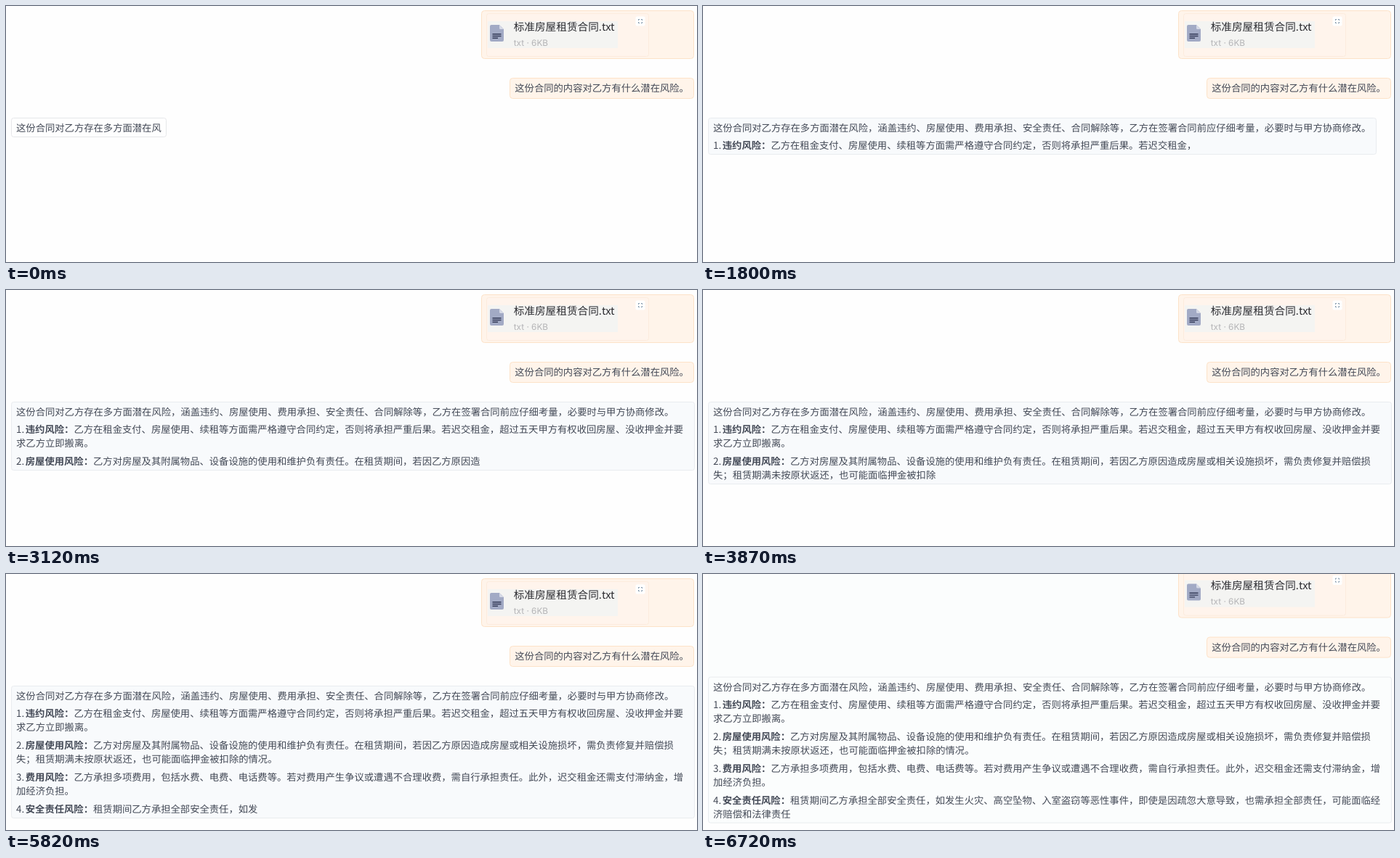
An HTML page for the animation above (8.36 s loop, 951 by 353 pixels).

```html
<!DOCTYPE html>
<html lang="zh-CN">
<head>
<meta charset="utf-8">
<style>
  html, body { margin: 0; width: 100%; height: 100%; overflow: hidden; background: #fefefe; }
  svg { display: block; width: 951px; height: 353px; }
  text { font: 13.32px "Noto Sans CJK SC", sans-serif; fill: #434956; text-rendering: geometricPrecision; }
  .title { font-weight: 700; }
  .name { font-size: 14.65px; fill: #2c2c31; }
  .meta { font: 11.8px Inter, sans-serif; fill: #b4b4b6; }
  .bubble { fill: #fff4ea; stroke: #fde2c8; }
</style>
</head>
<body>
<svg viewBox="0 0 951 353">
  <rect id="tint" x="7" width="940" height="343" fill="#fbfdfd"/>
  <g id="chat">
    <rect class="bubble" x="654.5" y="6.5" width="292" height="66" rx="4"/>
    <rect x="661.5" y="10.5" width="223" height="59" rx="3" fill="#fff4ec" stroke="#fcebdd"/>
    <rect x="663" y="21" width="179" height="37" fill="#f4f4f2"/>
    <path d="M668 26h11l6 6v15q0 2-2 2h-15q-2 0-2-2v-19q0-2 2-2z" fill="#a2aac5"/>
    <path d="M679 26l6 6h-4.5q-1.5 0-1.5-1.5z" fill="#d5d9e6"/>
    <path d="M669.5 38.7h12M669.5 41.5h12M669.5 44.3h7.5" stroke="#343b58" stroke-width="1.4"/>
    <text class="name" x="698.7" y="33.8">标准房屋租赁合同.txt</text>
    <text class="meta" x="698.7" y="54.5">txt · 6KB</text>
    <rect x="866.5" y="14.5" width="13" height="13" rx="2" fill="#fff"/>
    <path d="M870.5 20v-1.5h1.5M874 18.5h1.5v1.5M875.5 22v1.5h-1.5M872 23.5h-1.5v-1.5" fill="none" stroke="#7f95a9"/>
    <rect class="bubble" x="693.5" y="99.5" width="253" height="28" rx="4"/>
    <text x="700.3" y="118.2">这份合同的内容对乙方有什么潜在风险。</text>
    <rect id="box" x="7.5" y="154.5" rx="3"/>
    <g id="answer"></g>
  </g>
</svg>
<script>
const LOOP = 8360, LAST = 45, CHAR = 13.32, LEFT = 14, INDENT = 26.8;

// number, title, first line, wrapped line
const paragraphs = [
  ["", "", "这份合同对乙方存在多方面潜在风险，涵盖违约、房屋使用、费用承担、安全责任、合同解除等，乙方在签署合同前应仔细考量，必要时与甲方协商修改。", ""],
  ["1. ", "违约风险：", "乙方在租金支付、房屋使用、续租等方面需严格遵守合同约定，否则将承担严重后果。若迟交租金，超过五天甲方有权收回房屋、没收押金并要", "求乙方立即搬离。"],
  ["2. ", "房屋使用风险：", "乙方对房屋及其附属物品、设备设施的使用和维护负有责任。在租赁期间，若因乙方原因造成房屋或相关设施损坏，需负责修复并赔偿损", "失；租赁期满未按原状返还，也可能面临押金被扣除的情况。"],
  ["3. ", "费用风险：", "乙方承担多项费用，包括水费、电费、电话费等。若对费用产生争议或遭遇不合理收费，需自行承担责任。此外，迟交租金还需支付滞纳金，增", "加经济负担。"],
  ["4. ", "安全责任风险：", "租赁期间乙方承担全部安全责任，如发生火灾、高空坠物、入室盗窃等恶性事件，即使是因疏忽大意导致，也需承担全部责任，可能面临经", "济赔偿和法律责任。"],
];

// [step, characters typed]
const pace = [[0, 15], [12, 120], [15, 147], [21, 197], [26, 240], [34, 307], [37, 331], [44, 391], [45, 400]];

const [tint, chat, box, answer] = ["tint", "chat", "box", "answer"].map(id => document.getElementById(id));

// Steps last 150 ms, except three that are 10 ms shorter.
function stepAt(t) {
  const gained = [1940, 2680, 2970].filter(s => t >= s).length * 10;
  return Math.min(LAST, Math.floor((t + gained) / 150));
}

function typedAt(step) {
  const i = Math.max(1, pace.findIndex(([s]) => s >= step));
  const [s0, n0] = pace[i - 1], [s1, n1] = pace[i];
  return Math.round(n0 + (n1 - n0) * (step - s0) / (s1 - s0));
}

function render(step) {
  let left = typedAt(step), right = 0, bottom = 0, html = "";
  const take = text => {
    const shown = text.slice(0, Math.max(0, left));
    left -= text.length;
    return shown;
  };
  paragraphs.forEach((parts, i) => {
    if (left <= 0) return;
    const y = i ? 197.3 + 44 * (i - 1) : 173.3;
    const [number, title, first, wrapped] = parts.map(take);
    html += `<text x="${LEFT}" y="${y}">${number}<tspan class="title" x="${INDENT}">${title}</tspan><tspan>${first}</tspan></text>`;
    if (wrapped) html += `<text x="${LEFT}" y="${y + 18.7}">${wrapped}</text>`;
    const lineEnd = (i ? INDENT : LEFT) + (title + first).length * CHAR + 6.6;
    right = Math.max(right, wrapped ? 946.5 : lineEnd);
    bottom = y + (wrapped ? 18.7 : 0) + 7.9;
  });
  const scrolled = step === LAST;
  answer.innerHTML = html;
  box.setAttribute("width", Math.round(right) - 7);
  box.setAttribute("height", Math.round(bottom) - 155);
  box.setAttribute("fill", scrolled ? "#fbfdfd" : step ? "#f8fafc" : "#fefefe");
  box.setAttribute("stroke", step ? "#e9ecef" : "#e6e7ea");
  tint.setAttribute("visibility", scrolled ? "visible" : "hidden");
  chat.setAttribute("transform", `translate(0 ${scrolled ? -12.4 : 0})`);
}

let current = -1;
function tick() {
  const step = stepAt(performance.now() % LOOP);
  if (step !== current) render(current = step);
  requestAnimationFrame(tick);
}
tick();
</script>
</body>
</html>
```
